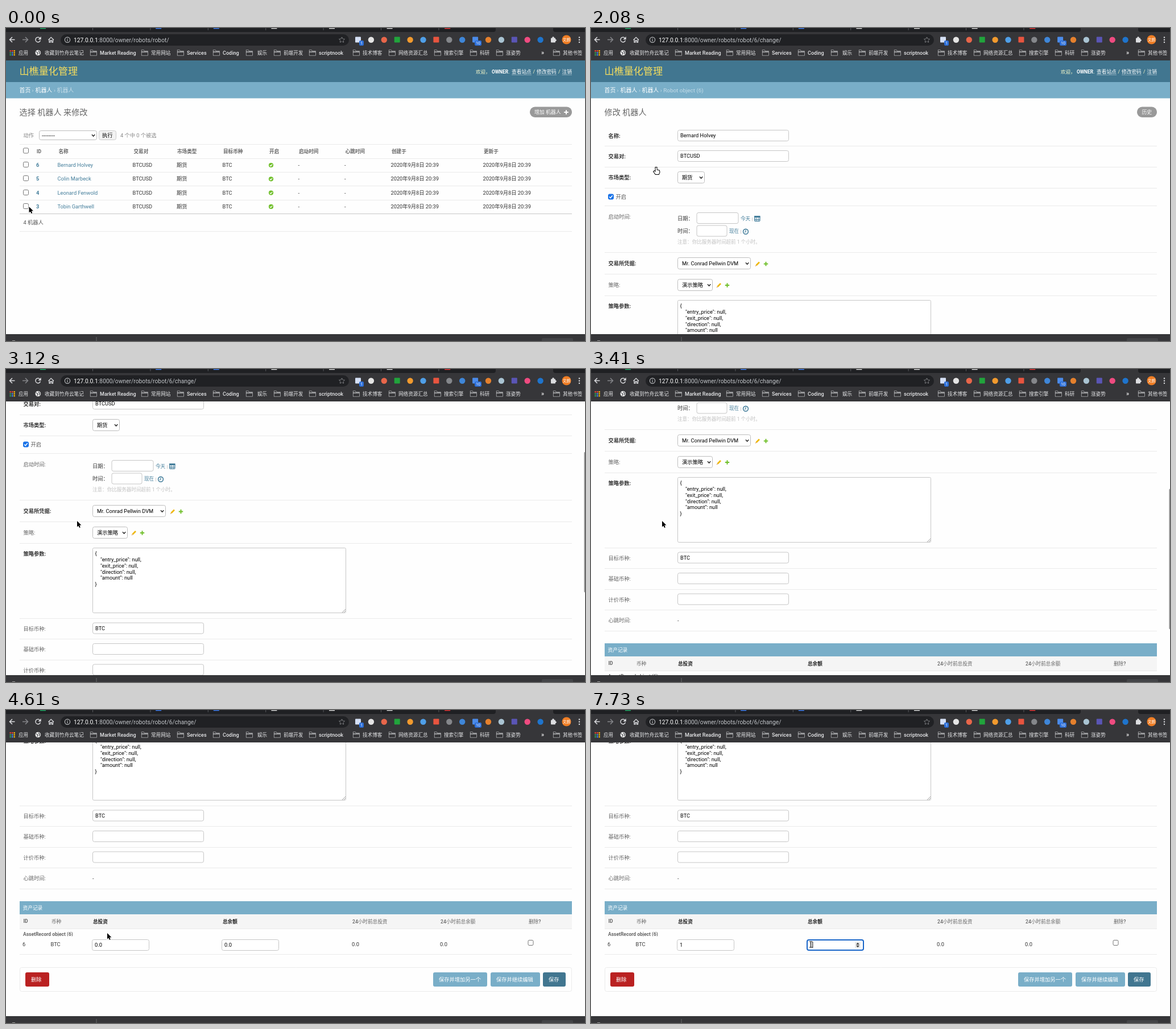
Animation, 1018 px wide and 550 px high, one loop 8 s. Source, as an HTML page with a canvas:

```html
<!DOCTYPE html>
<html lang="zh">
<head>
<meta charset="utf-8">
<style>
html, body { margin: 0; width: 100%; height: 100%; overflow: hidden; background: #fff; }
canvas { display: block; }
</style>
</head>
<body>
<canvas id="stage" width="1018" height="550"></canvas>
<script>
const ctx = document.getElementById('stage').getContext('2d');
const LOOP = 8000, TICK = 148.8;
const BLUE = '#417690', SKY = '#79aec8', LINK = '#447e9b', BAR = '#363639', ICON = '#dcdde0';
const LIST_PATH = '/owner/robots/robot/', FORM_PATH = LIST_PATH + '6/change/';

// ---- drawing helpers ----
function text(s, x, y, color = '#333', size = 9.28, weight = 400) {
  ctx.font = `${weight} ${size}px Roboto, "Noto Sans CJK SC", sans-serif`;
  ctx.fillStyle = color;
  ctx.fillText(s, x, y + size * 0.37);
}
function rect(x, y, w, h, color) {
  ctx.fillStyle = color;
  ctx.fillRect(x, y, w, h);
}
function box(x, y, w, h, fill, r = 3, border, width = 1) {
  const inset = border ? width / 2 : 0;
  ctx.beginPath();
  ctx.roundRect(x + inset, y + inset, w - 2 * inset, h - 2 * inset, r);
  ctx.fillStyle = fill;
  ctx.fill();
  if (border) { ctx.strokeStyle = border; ctx.lineWidth = width; ctx.stroke(); }
}
function disc(x, y, r, fill, border, width = 1.3) {
  ctx.beginPath();
  ctx.arc(x, y, r, 0, 7);
  if (fill) { ctx.fillStyle = fill; ctx.fill(); }
  if (border) { ctx.strokeStyle = border; ctx.lineWidth = width; ctx.stroke(); }
}
function line(color, width, pts, fill) {
  ctx.beginPath();
  pts.forEach(([x, y]) => ctx.lineTo(x, y));
  if (fill) ctx.closePath();
  ctx.strokeStyle = color;
  ctx.lineWidth = width;
  ctx.stroke();
  if (fill) { ctx.fillStyle = fill; ctx.fill(); }
}
const shift = (x, y, pts) => pts.map(([a, b]) => [x + a, y + b]);
const rule = (y, color = '#eaeaea', h = 1) => rect(24, y, 971, h, color);

// Linear value along a track of [tick, ...values]
function along(track, tick) {
  let i = track.findIndex(p => p[0] > tick);
  if (i < 0) return track.at(-1).slice(1);
  if (!i) return track[0].slice(1);
  const a = track[i - 1], b = track[i], f = (tick - a[0]) / (b[0] - a[0]);
  return a.slice(1).map((v, n) => v + (b[n + 1] - v) * f);
}

// ---- form controls ----
const input = (x, y, w, value = '', h = 20) => {
  box(x, y, w, h, '#fff', 3, '#c6c6c6');
  text(value, x + 5, y + 9.7, '#000');
};
function checkbox(x, y, on) {
  box(x, y, 10, 10, on ? '#1a73e8' : '#fff', 2, on ? '#1a73e8' : '#767676');
  if (on) line('#fff', 1.5, shift(x, y, [[2.2, 5], [4.2, 7.2], [7.8, 2.8]]));
}
function select(x, y, w, h, label, pad = 8) {
  box(x, y, w, h, '#fff', 3, '#bdbdbd');
  text(label, x + pad, y + h / 2, '#000');
  line('#222', 1.4, shift(x + w - 9, y + h / 2 - 1.2, [[0, 0], [2.6, 3], [5.2, 0]]));
}
function plus(x, y, r, color, width = 2) {
  line(color, width, [[x - r, y], [x + r, y]]);
  line(color, width, [[x, y - r], [x, y + r]]);
}
function editIcons(x, y) {
  line('#efb80b', 2.6, [[x - 2.5, y + 2.5], [x + 3, y - 3]]);
  line('#d9a87a', 1.4, [[x - 4, y + 4], [x - 2.5, y + 2.5]]);
  plus(x + 14.5, y, 3.7, '#70bf2b', 2);
}
function button(x, y, w, label, color) {
  box(x, y, w, 25, color);
  text(label, x + 10, y + 12.3, '#fff', 9.28, 500);
}
function numberField(x, value, focused, selected, caret) {
  const y = 837;
  box(x, y, 101, 20, '#fff', 3, focused ? '#1865c8' : '#c6c6c6', focused ? 2 : 1);
  if (selected) rect(x + 5, y + 4, 13.5, 11, '#b3d7ff');
  text(value, x + 5, y + 9.8, '#000', 9.4);
  if (caret) rect(x + 10.3, y + 4, 1, 11, '#000');
  if (focused) {
    box(x + 85, y + 4, 10, 12, '#ececec', 2);
    line('#444', .5, shift(x + 90, y + 9, [[-2.5, 0], [0, -3], [2.5, 0]]), '#444');
    line('#444', .5, shift(x + 90, y + 11, [[-2.5, 0], [0, 3], [2.5, 0]]), '#444');
  }
}

// ---- browser frame ----
const folders = [[148, 'Market Reading'], [238, '常用网站'], [301, 'Services'], [364, 'Coding'],
  [422, '娱乐', 20], [471, '前端开发'], [533, 'scriptnook'], [610, '技术博客'], [673, '网络资源汇总'],
  [753, '搜索引擎'], [816, '科研'], [862, '涨姿势'], [962, '其他书签']];
const extensions = ['#d5e0f5', '#e4e4e4', '#e8664a', '#21a43c', '#f29a2e', '#4f9fe8', '#e8543f', '#85878b',
  '#3f86d8', '#4b8bea', '#e5802d', '#a9c3d2', '#5a55b5', '#ef4b80', '#1f74cc'];
const tabMarks = ['#1ea362', 0, '#3b78e7', '#3b78e7', '#ccc', '#ccc', '#ccc', '#d33'];

const bookmarkText = (s, x) => text(s, x, 43.5, '#e6e7e9', /[a-z]/.test(s) ? 9.05 : 8.6, 500);

function folder(x) {
  line(ICON, 1.2, shift(x, 39, [[.5, 0], [4, 0], [5.5, 1.8], [11, 1.8], [11, 9], [.5, 9]]), BAR);
  line(ICON, 1.2, [[x, 42], [x + 11, 42]]);
}
function toolbar(loading, path) {
  rect(0, 0, 1018, 57, BAR);
  box(-9, -9, 870, 16, '#1f2023', 4);
  box(962, -9, 70, 16, '#1f2023', 4);
  tabMarks.forEach((color, i) => {
    if (i < 7) rect(152 + i * 101.4, 0, 1, 4, '#55575b');
    if (color) rect(60 + i * 101.6, 0, 10, 1.5, color);
  });

  line(ICON, 1.5, [[15.5, 20.5], [6.5, 20.5]]);
  line(ICON, 1.5, [[11, 16], [6.5, 20.5], [11, 25]]);
  line('#85868a', 1.5, [[29, 20.5], [38, 20.5]]);
  line('#85868a', 1.5, [[34, 16], [38.5, 20.5], [34, 25]]);
  if (loading) {
    line(ICON, 1.5, [[52, 16.5], [60.5, 25]]);
    line(ICON, 1.5, [[60.5, 16.5], [52, 25]]);
  } else {
    ctx.beginPath();
    ctx.arc(56.3, 20.5, 4.3, .3, 5.5);
    ctx.strokeStyle = ICON;
    ctx.lineWidth = 1.5;
    ctx.stroke();
    line(ICON, .5, [[61.4, 15.5], [61.4, 20], [56.9, 20]], ICON);
  }
  line(ICON, 1.3, [[74.5, 21], [79.2, 16.3], [84, 21]]);
  line(ICON, 1.3, [[76, 20], [76, 25], [78, 25], [78, 22], [80.5, 22], [80.5, 25], [82.5, 25], [82.5, 20]]);

  box(96, 11, 507, 20, '#202124', 10);
  disc(108, 20.8, 4.6, null, '#b8babd', 1.2);
  rect(107.4, 20, 1.2, 3.3, '#b8babd');
  rect(107.4, 18, 1.2, 1.2, '#b8babd');
  text('127.0.0.1', 119, 21, '#fff', 10.3);
  const hostWidth = ctx.measureText('127.0.0.1').width;
  text(':8000' + path, 119 + hostWidth, 21, '#c2c5c9', 10.3);
  const star = Array.from({ length: 10 }, (_, i) => {
    const a = i * Math.PI / 5 - Math.PI / 2, r = i % 2 ? 2.2 : 5;
    return [590.5 + r * Math.cos(a), 21 + r * Math.sin(a)];
  });
  line('#c4c6ca', 1, star, '#202124');

  extensions.forEach((color, i) => {
    const x = 619 + i * 22.9;
    if (i % 3) disc(x, 20.7, 5.2, color);
    else box(x - 5, 15.5, 10, 10, color, 1);
  });
  for (const [x, w, n] of [[621, 8, '1'], [824, 12, '10']]) {
    box(x, 22, w, 9, '#2d6fd8', 2);
    text(n, x + 2, 26.5, '#fff', 7);
  }
  box(958, 17.5, 8, 8, ICON, 1);
  disc(962, 17, 1.8, ICON);
  disc(966, 21.5, 1.8, ICON);
  disc(985.5, 20.5, 8, '#ef7d24');
  text('文朗', 979, 20.5, '#fff', 6.6);
  for (const y of [16.5, 20.7, 25]) disc(1008, y, 1.2, ICON);

  const dots = ['#ea4335', '#ea4335', '#fbbc05', '#34a853', '#4285f4', '#fbbc05', '#34a853', '#4285f4', '#fbbc05'];
  dots.forEach((c, i) => rect(6.5 + i % 3 * 3.5, 39 + (i / 3 | 0) * 3.5, 2.4, 2.4, c));
  bookmarkText('应用', 22);
  disc(56.3, 43.5, 4.8, '#eee');
  line('#55575b', 1.4, [[52.5, 41.5], [56, 43.5], [55, 47]]);
  line('#55575b', 1.4, [[57, 40], [59.5, 43], [58.5, 46]]);
  bookmarkText('收藏到竹舟云笔记', 68);
  for (const [x, label, gap = 17] of folders) { folder(x); bookmarkText(label, x + gap); }
  text('»', 941, 43, '#fff', 10.5, 500);
}
function downloadBar() {
  rect(0, 538, 1018, 12, BAR);
  rect(0, 538, 1018, 1, '#2a2b2d');
  rect(158.5, 543, 1, 7, '#66686b');
  box(942, 545, 55, 12, '#434447', 2);
  rect(11, 549, 5, 1, '#999');
}

// ---- pages ----
function pageHeader(onForm) {
  rect(0, 57, 1018, 38, BLUE);
  text('山樵量化管理', 23.5, 76, '#f5dd5d', 17.1, 300);
  text('欢迎，', 826, 76.5, '#ffc', 8.5);
  text('OWNER', 854, 76.5, '#fff', 8.4, 700);
  text('.', 883.5, 76.5, '#ffc', 8.7);
  for (const [s, x, w] of [['查看站点', 889, 35], ['修改密码', 933, 35], ['注销', 977.5, 17.5]]) {
    text(s, x, 76.5, '#fff', 8.7);
    rect(x, 82, w, 1, 'rgba(255,255,255,.35)');
  }
  text('/', 926.5, 76.5, '#ffc', 8.7);
  text('/', 971, 76.5, '#ffc', 8.7);
  rect(0, 95, 1018, 28.5, SKY);
  text('首页', 23.5, 109.5, '#fff', 9.9, 500);
  text('机器人', 51.5, 109.5, '#fff', 9.9, 500);
  text('›', 45.5, 109, '#c4dce8', 9.9);
  text('›', 84, 109, '#c4dce8', 9.9);
  text('机器人', 89.5, 109.5, onForm ? '#fff' : '#c4dce8', 9.9, onForm ? 500 : 400);
  if (onForm) text('› Robot object (6)', 121.8, 109.2, '#c4dce8', 9.9);
}

const heads = [['ID', 54], ['名称', 92.5], ['交易对', 224.5], ['市场类型', 301], ['目标币种', 382], ['开启', 463],
  ['启动时间', 515], ['心跳时间', 596.5], ['创建于', 678], ['更新于', 840]];
const robots = ['Bernard Holvey', 'Colin Marbeck', 'Leonard Fenwold', 'Tobin Garthwell'];

function listPage(hover) {
  pageHeader(false);
  text('选择 机器人 来修改', 23.5, 148, '#666', 14.14, 300);
  box(921, 138.5, 74, 18.5, '#999', 9);
  text('增加 机器人', 929, 148, '#fff', 8.9, 500);
  plus(985, 148, 3.8, '#fff');

  text('动作', 30.5, 188.5, '#888');
  select(58, 180, 102, 17, '---------', 5);
  box(163, 180, 31, 17, '#f2f2f2', 3, '#ccc');
  text('执行', 169, 188.5, '#000');
  text('4 个中 0 个被选', 201, 188.5, '#888');

  rule(204);
  checkbox(30, 210.5);
  for (const [s, x] of heads) text(s, x, 217, '#666', 8.6, 700);
  rule(229);
  robots.forEach((name, i) => {
    const y = 240.5 + i * 24.3;
    checkbox(30, Math.round(y - 5.5));
    text(6 - i, 53, y, LINK, 9.28, 700);
    const hot = hover && !i;
    text(name, 90.5, y, hot ? '#036' : LINK);
    if (hot) rect(90.5, 244.5, ctx.measureText(name).width, 1, '#036');
    text('BTCUSD', 222.5, y);
    text('期货', 300, y);
    text('BTC', 380.5, y);
    disc(466, y + .5, 4.1, '#70bf2b');
    line('#fff', 1.3, shift(466, y + .5, [[-2, 0], [-.5, 1.7], [2.2, -1.5]]));
    text('-', 513.5, y);
    text('-', 595, y);
    text('2020年9月8日 20:39', 676.5, y);
    text('2020年9月8日 20:39', 838.5, y);
    rule(Math.round(y + 12.4), i < 3 ? '#eaeaea' : '#c8c8c8');
  });
  text('4 机器人', 30.5, 342, '#555');
  rule(357);
}

const rows = [['名称', 189.5, 1], ['交易对', 226, 1], ['市场类型', 262.5, 1], ['启动时间', 331.5], ['交易所凭据', 413.5, 1],
  ['策略', 451.5], ['策略参数', 489, 1], ['目标币种', 620.5], ['基础币种', 657], ['计价币种', 693.5], ['心跳时间', 730]];
const json = ['{', '"entry_price": null,', '"exit_price": null,', '"direction": null,', '"amount": null', '}'];

function formPage(tick) {
  pageHeader(true);
  text('修改 机器人', 23.5, 148, '#666', 14.14, 300);
  box(960, 138.5, 35, 18.5, '#999', 9);
  text('历史', 968.5, 147.7, '#fff', 8.9, 500);

  for (const [s, y, bold] of rows) text(s + ':', 30.5, y, bold ? '#333' : '#666', 9.28, bold ? 700 : 400);
  for (const y of [207, 244, 281, 312, 394, 432, 470, 602, 638, 675, 711, 748]) rule(y);
  input(152, 179, 196, robots[0]);
  input(152, 215, 196, 'BTCUSD');
  select(152, 252, 48, 21, '期货');
  checkbox(30, 291.5, true);
  text('开启', 43.5, 297, '#555');

  text('日期：', 152, 335, '#333', 9.28, 500);
  text('时间：', 152, 357, '#333', 9.28, 500);
  input(185.5, 324, 74);
  input(185.5, 346.5, 54);
  text('今天', 263, 335, LINK, 8.6);
  text('现在', 243, 357, LINK, 8.6);
  text('|', 282.5, 335, '#aaa', 8);
  text('|', 262.5, 357, '#aaa', 8);
  box(287, 330.5, 10.5, 9.5, '#fff', 1, LINK, 1.3);
  rect(287, 330, 10.5, 3, LINK);
  for (const x of [290, 293.5]) rect(x, 333, 1, 6.5, LINK);
  rect(288, 336, 9, 1, LINK);
  disc(272, 357.8, 4.4, '#fff', LINK, 1.6);
  line(LINK, 1.2, [[272, 355], [272, 358], [270, 359]]);
  text('注意：你比服务器时间超前 1 个小时。', 152, 376, '#c2c2c2', 8.55);

  select(152, 403, 129, 21, 'Mr. Conrad Pellwin DVM');
  editIcons(293, 414.5);
  select(152, 441, 62, 21, '演示策略');
  editIcons(225, 452);

  box(152, 478, 446, 115, '#fff', 2, '#c6c6c6');
  json.forEach((s, i) => text(s, i % 5 ? 166 : 156.5, 488 + i * 10.7, '#000'));
  line('#888', .8, [[591, 592], [597, 586]]);
  line('#888', .8, [[594, 592], [597, 589]]);
  input(152, 609.5, 196, 'BTC');
  input(152, 646, 196);
  input(152, 682.5, 196);
  text('-', 152, 729.5);

  rect(24, 770, 971, 23, SKY);
  text('资产记录', 29.5, 782, '#fff', 8.7, 500);
  rect(24, 793, 971, 25, '#f5f5f5');
  rule(818);
  text('ID', 30.5, 805, '#666', 8.6, 700);
  text('币种', 80, 806, '#666', 8.6, 500);
  text('总投资', 153, 806, '#222', 8.6, 700);
  text('总余额', 381, 806, '#222', 8.6, 700);
  text('24小时前总投资', 609, 806, '#666', 8.6, 500);
  text('24小时前总余额', 764, 806, '#666', 8.6, 500);
  text('删除?', 919, 806, '#666', 8.6, 500);
  ctx.save();
  ctx.beginPath();
  ctx.rect(24, 820, 200, 11.5);
  ctx.clip();
  text('AssetRecord object (6)', 30, 828.3, '#666', 8.5, 700);
  ctx.restore();
  text('6', 29, 846);
  text('BTC', 78.5, 846);
  const typedFirst = tick >= 40, typedSecond = tick >= 52;
  numberField(151, typedFirst ? '1' : '0.0', tick >= 35 && tick < 46, tick >= 36 && !typedFirst, typedFirst && tick < 46);
  numberField(379, typedSecond ? '1' : '0.0', tick >= 46, tick >= 47 && !typedSecond, typedSecond);
  text('0.0', 608, 846);
  text('0.0', 763, 846);
  checkbox(917.5, 838);
  rule(863);

  box(24, 886, 971, 43, '#fefefe', 3, '#ebebeb');
  button(34, 895, 42, '删除', '#ba2121');
  button(751, 895, 95, '保存并增加另一个', SKY);
  button(852, 895, 87, '保存并继续编辑', SKY);
  button(944, 895, 40, '保存', BLUE);
}

// ---- pointer ----
const pointerTrack = [[0, 40.5, 314], [1, 49, 305], [3, 89, 268], [5, 115, 245], [14, 115, 245], [16, 125, 267],
  [28, 125, 267], [31, 178, 392], [33, 181, 408], [35, 168, 412], [36, 145, 416], [40, 145, 416], [42, 232, 428],
  [44, 340, 430], [45, 397, 412], [46, 394, 412], [47, 388, 412], [48, 386.5, 412]];
const arrow = [[0, 0], [0, 10.6], [2.4, 8.4], [4, 12], [5.8, 11.2], [4.2, 7.6], [7.5, 7.4]];
const hand = [[-1.5, 0], [.5, 0], [.8, 4.5], [5, 5.5], [5.5, 8.5], [4, 12], [-1.5, 12], [-4.8, 7.2], [-3.5, 6.2], [-1.5, 8]];

function pointer(tick) {
  const [x, y] = along(pointerTrack, tick);
  if (tick >= 5 && tick < 15) {
    line('#000', 2, shift(x, y, hand), '#fff');
  } else if ((tick >= 34 && tick < 41) || tick >= 45) {
    for (const [color, width] of [['#fff', 2.4], ['#111', 1.1]]) {
      line(color, width, [[x, y - 4.5], [x, y + 4.5]]);
      line(color, width, [[x - 2.5, y - 5], [x + 2.5, y - 5]]);
      line(color, width, [[x - 2.5, y + 5], [x + 2.5, y + 5]]);
    }
  } else {
    line('#fff', 1.8, shift(x, y, arrow), '#000');
  }
}

const scrollTrack = [[17, 0], [18, 16], [19, 60], [21, 164], [24, 350], [25, 407], [26, 419], [28, 419], [29, 434]];

function draw(time) {
  const tick = Math.floor(time / TICK + .09);
  const onForm = tick >= 13;
  const scroll = Math.round(along(scrollTrack, tick)[0]);

  rect(0, 0, 1018, 550, '#fefefe');
  ctx.save();
  ctx.translate(0, -scroll);
  if (onForm) formPage(tick);
  else listPage(tick >= 5);
  ctx.restore();
  if (tick >= 19 && tick < 30) box(1016.5, 60 + scroll * .5226, 4, 247, '#8c8c8c', 2);

  toolbar(tick >= 8 && tick < 14, tick >= 8 ? FORM_PATH : LIST_PATH);
  downloadBar();
  if (tick >= 7 && tick < 14) {
    box(-5, 523, 194, 15.5, '#2b2c2f', 3);
    text('127.0.0.1:8000' + FORM_PATH, -1, 531, '#e4e5e8', 8.8);
  }
  pointer(tick);
}

function loop() {
  draw(performance.now() % LOOP);
  requestAnimationFrame(loop);
}
loop();
</script>
</body>
</html>
```
